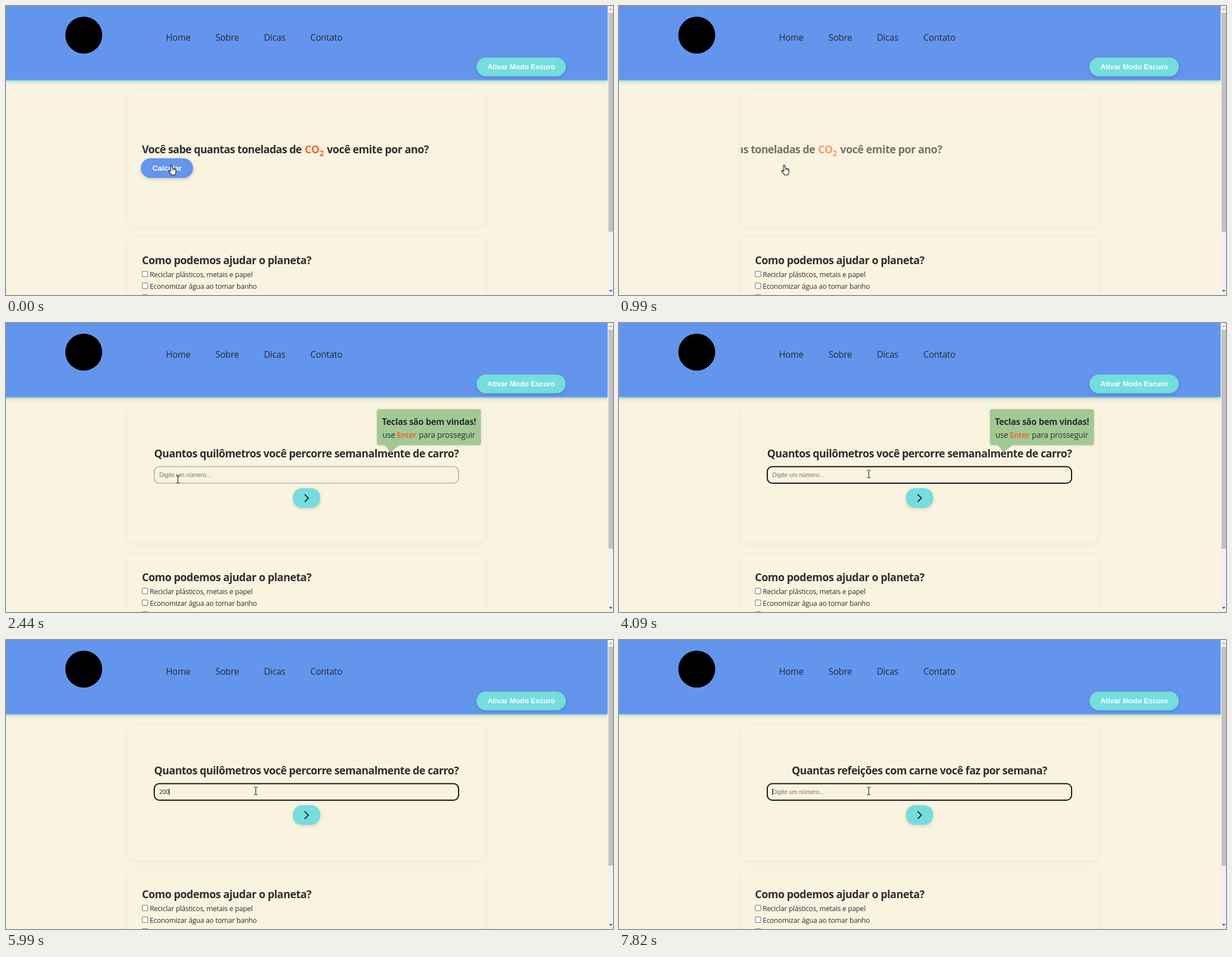
An HTML page with a canvas that plays this animation: 1085x516 px, repeating every 8000 ms.

```html
<!DOCTYPE html>
<html lang="pt-BR">
<head>
<meta charset="utf-8">
<title>Calculadora de CO2</title>
<style>
  html, body { margin: 0; width: 100%; height: 100%; overflow: hidden; background: #faf3e0; }
  canvas { display: block; width: 1085px; height: 516px; }
</style>
</head>
<body>
<canvas id="stage"></canvas>
<script>
const W = 1085, H = 516, LOOP = 8000;
const PAGE = '#faf3e0', INK = '#2e2e2e', BLUE = '#6495ed', AQUA = '#75dddd', ORANGE = '#ec6a33';
const SANS = '"Open Sans", "Noto Sans", sans-serif';
const ARIAL = '"Liberation Sans", Arial, sans-serif';

const canvas = document.getElementById('stage');
const ctx = canvas.getContext('2d');
const dpr = window.devicePixelRatio || 1;
canvas.width = W * dpr;
canvas.height = H * dpr;

const clamp = v => Math.min(1, Math.max(0, v));
const lerp = (a, b, p) => a + (b - a) * p;

// cubic-bezier(.42, 0, .58, 1)
function easeInOut(x) {
  let lo = 0, hi = 1;
  for (let i = 0; i < 20; i++) {
    const s = (lo + hi) / 2, r = 1 - s;
    if (3 * r * r * s * 0.42 + 3 * r * s * s * 0.58 + s * s * s < x) lo = s; else hi = s;
  }
  return lo * lo * (3 - 2 * lo);
}

function text(str, x, y, size, { weight = 400, family = SANS, color = INK, align = 'left', track = 0 } = {}) {
  ctx.font = `${weight} ${size}px ${family}`;
  ctx.letterSpacing = track + 'px';
  ctx.textAlign = align;
  ctx.fillStyle = color;
  ctx.fillText(str, x, y);
}

const heading = (str, x, y, opts) => text(str, x, y, 19, { weight: 700, track: -0.5, ...opts });

function box(x, y, w, h, r, fill, shadow) {
  ctx.save();
  if (shadow) {
    const [dy, blur, alpha] = shadow;
    ctx.shadowColor = `rgba(0,0,0,${alpha})`;
    ctx.shadowBlur = blur * dpr;
    ctx.shadowOffsetY = dy * dpr;
  }
  ctx.beginPath();
  ctx.roundRect(x, y, w, h, r);
  ctx.fillStyle = fill;
  ctx.fill();
  ctx.restore();
}

function poly(points, fill, stroke, width = 1) {
  ctx.beginPath();
  points.forEach(([x, y], i) => i ? ctx.lineTo(x, y) : ctx.moveTo(x, y));
  if (fill) {
    ctx.closePath();
    ctx.fillStyle = fill;
    ctx.fill();
  }
  if (stroke) {
    ctx.strokeStyle = stroke;
    ctx.lineWidth = width;
    ctx.stroke();
  }
}

function header() {
  box(0, 0, 1076, 134, 0, AQUA, [2, 7, 0.14]);
  box(0, 0, 1076, 132, 0, BLUE);
  ctx.beginPath();
  ctx.arc(139, 52, 33, 0, Math.PI * 2);
  ctx.fillStyle = '#000';
  ctx.fill();
  [['Home', 286], ['Sobre', 374.5], ['Dicas', 461], ['Contato', 544]]
    .forEach(([label, x]) => text(label, x, 62, 15.8, { weight: 500, track: -0.2, color: '#262a30' }));
  box(841, 92, 159.5, 33.5, 16.7, AQUA, [2, 6, 0.14]);
  text('Ativar Modo Escuro', 921, 112.5, 12.8, { weight: 700, family: ARIAL, color: '#fff', align: 'center' });
}

function tips() {
  box(218, 412, 638, 200, 9, PAGE, [1, 10, 0.06]);
  heading('Como podemos ajudar o planeta?', 243, 461, { track: -0.45 });
  ['Reciclar plásticos, metais e papel', 'Economizar água ao tomar banho', 'Usar bicicleta em vez de carro']
    .forEach((label, i) => {
      const y = 473 + i * 21;
      box(243, y, 11, 11, 2, '#767676');
      box(244, y + 1, 9, 9, 1.2, '#fff');
      text(label, 257, y + 10.5, 12.5, { track: -0.2 });
    });
}

function scrollbar() {
  box(1075.5, 0, 9.5, H, 0, '#f1f1f1');
  box(1077, 12, 8, 391, 0, '#c1c1c1');
  poly([[1078, 7], [1084, 7], [1081, 4]], '#a3a3a3');
  poly([[1078, 507], [1084, 507], [1081, 510.5]], '#505050');
}

// Opening panel slides left by its own width while fading out
function intro(t) {
  const p = easeInOut(clamp((t - 663) / 800));
  if (p >= 1) return;
  ctx.save();
  ctx.beginPath();
  ctx.rect(218, 153, 638, 240);
  ctx.clip();
  ctx.globalAlpha = 1 - p;
  ctx.translate(-512 * p, 0);
  heading('Você sabe quantas toneladas de', 243, 263, { track: -0.6 });
  heading('CO', 534, 263, { color: ORANGE, track: -0.2 });
  text('2', 560.5, 267.5, 13.8, { weight: 700, color: ORANGE });
  heading('você emite por ano?', 573.5, 263, { track: -0.45 });
  box(241, 272, 93.5, 35, 17.5, BLUE, [2, 6, 0.2]);
  text('Calcular', 288, 294, 13.33, { weight: 700, family: ARIAL, color: '#fff', align: 'center' });
  ctx.restore();
}

const QUESTIONS = [
  [1580, ['Quantos quilômetros você percorre semanalmente de carro?']],
  [6300, ['Quantos quilômetros você percorre semanalmente de', 'transporte público?']],
  [7820, ['Quantas refeições com carne você faz por semana?']]
];
const VALUES = [[0, ''], [4920, '2'], [5450, '20'], [5990, '200'], [6300, ''], [7540, '5'], [7820, '']];
const BLINKS = [3560, 4920, 5450, 5990, 6320, 7540, 7820];
const FOCUS = 3560;

const latest = (list, t) => list.filter(([at]) => at <= t).pop();

function form(t) {
  const lines = latest(QUESTIONS, t)[1];
  const value = latest(VALUES, t)[1];
  const shift = (lines.length - 1) * 14.6;
  lines.forEach((line, i) =>
    heading(line, 537, 240 - shift + i * 29.2, { align: 'center', track: -0.55 }));

  ctx.save();
  ctx.translate(0, Math.round(shift));
  const focused = t >= FOCUS;
  ctx.beginPath();
  ctx.roundRect(265, 256.5, 544, 29.5, 9);
  ctx.strokeStyle = focused ? '#101010' : '#b3b0b3';
  ctx.lineWidth = focused ? 2 : 1.7;
  ctx.stroke();
  const field = { family: ARIAL, color: value ? INK : '#757575' };
  text(value || 'Digite um número...', 274, 275, 10.67, field);
  if (focused) {
    const since = t - BLINKS.filter(at => at <= t).pop();
    if (Math.floor(since / 530) % 2 === 0) {
      const x = 274 + (value ? Math.round(ctx.measureText(value).width) - 0.5 : 0);
      box(x, 265, 1, 12, 0, '#111');
    }
  }
  box(513, 295, 48.5, 35, 16, AQUA, [2, 6, 0.14]);
  ctx.lineCap = ctx.lineJoin = 'round';
  poly([[534.3, 306.5], [540.6, 312.6], [534.3, 318.7]], null, '#222', 1.9);
  ctx.restore();
}

function tooltip(t) {
  const alpha = Math.min(clamp((t - 1600) / 300), 1 - clamp((t - 4510) / 250));
  if (alpha <= 0) return;
  const green = '#a2c994';
  ctx.save();
  ctx.globalAlpha = alpha;
  box(663, 154, 186, 64, 4, green, [1, 4, 0.12]);
  poly([[677, 217.5], [704, 217.5], [687, 231]], green);
  text('Teclas são bem vindas!', 756, 181.5, 15.5, { weight: 700, align: 'center', track: -0.3 });
  text('use', 673, 204.5, 14, { track: -0.1 });
  text('Enter', 698.5, 204.5, 13.5, { weight: 700, color: '#ee6545', track: -0.3 });
  text('para prosseguir', 738, 204.5, 14, { track: -0.1 });
  ctx.restore();
}

// time, x, y of the pointer's hot spot
const PATH = [
  [0, 296.5, 284.5], [2030, 296.5, 284.5], [2250, 300, 283], [2440, 307, 279], [2540, 335, 272],
  [2650, 400, 258], [2740, 445, 248], [2890, 445, 248], [3080, 447.5, 268], [3310, 447.5, 268],
  [3330, 446.5, 269.5], [LOOP, 446.5, 269.5]
];

function pointerAt(t) {
  const i = Math.max(1, PATH.findIndex(k => k[0] > t));
  const [t0, x0, y0] = PATH[i - 1], [t1, x1, y1] = PATH[i];
  const p = (t - t0) / (t1 - t0);
  return [lerp(x0, x1, p), lerp(y0, y1, p)];
}

function hand() {
  ctx.lineJoin = 'round';
  poly([[-2.5, 0.5], [-1.2, -0.5], [0.2, 0.5], [0.4, 5.3], [2.4, 5.2], [3, 6], [4.8, 5.7], [5.4, 6.7],
    [6.8, 6.8], [7.3, 8], [7.2, 13], [5.6, 15.2], [5.5, 17.3], [-1.2, 17.3], [-1.4, 15.6],
    [-5.6, 10.6], [-5.2, 9], [-3.8, 9.2], [-2.5, 10.8], [-2.5, 0.5]], '#fff', '#111', 1.1);
  [0.4, 3, 5.4].forEach(x => poly([[x, 6.2], [x, 9.5]], null, '#111', 0.8));
}

function beam() {
  box(-0.6, -6, 1.2, 12.5, 0, '#222');
  [-7, 6.2].forEach(y => {
    box(-3.2, y, 2.7, 1.1, 0, '#222');
    box(0.5, y, 2.7, 1.1, 0, '#222');
  });
}

function arrow() {
  poly([[0, 0], [0, 15], [3.4, 11.8], [5.7, 17], [8, 16], [5.8, 11], [10.6, 11], [0, 0]], '#fff', '#111', 1);
}

function pointer(t) {
  const [x, y] = pointerAt(t);
  ctx.save();
  ctx.translate(x, y);
  if (t < 1580) hand();
  else if (y < 256) arrow();
  else beam();
  ctx.restore();
  if ((t >= 500 && t < 670) || (t >= FOCUS && t < 3650)) {
    ctx.beginPath();
    ctx.arc(t < 670 ? 294.5 : x, t < 670 ? 283.5 : y, 9.5, 0, Math.PI * 2);
    ctx.fillStyle = 'rgba(255,255,0,.47)';
    ctx.fill();
  }
}

function draw(t) {
  ctx.setTransform(dpr, 0, 0, dpr, 0, 0);
  ctx.fillStyle = PAGE;
  ctx.fillRect(0, 0, W, H);
  header();
  box(218, 153, 638, 240, 9, PAGE, [1, 10, 0.06]);
  tips();
  if (t < 1580) {
    intro(t);
  } else {
    form(t);
    tooltip(t);
  }
  scrollbar();
  pointer(t);
}

const start = performance.now();
function tick() {
  draw((performance.now() - start) % LOOP);
  requestAnimationFrame(tick);
}
tick();
</script>
</body>
</html>
```
